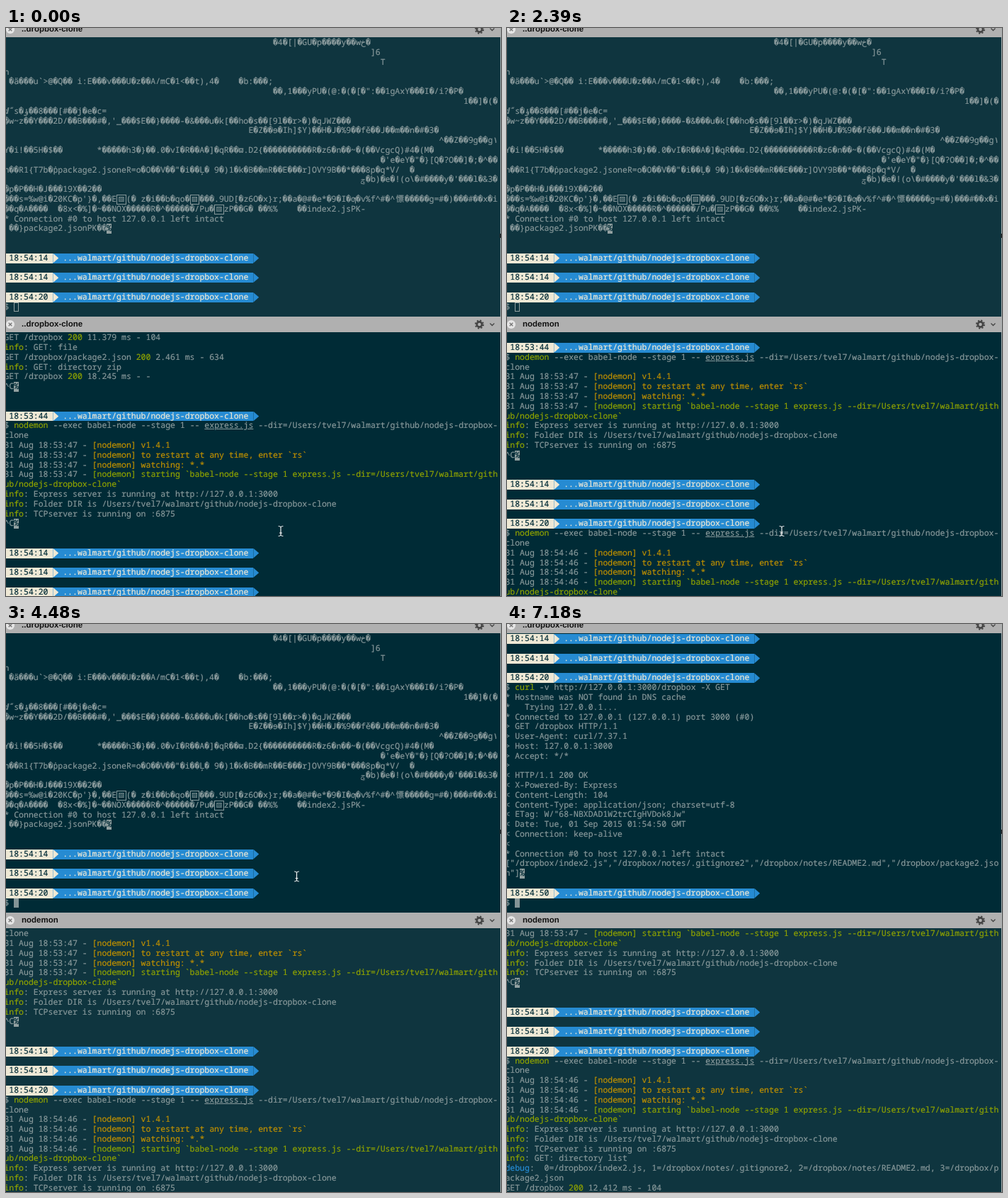
Recreate the animation shown at these times as an HTML page. Size 699 by 801 pixels, loop 8000 ms.

```html
<!DOCTYPE html>
<html lang="en">
<head>
<meta charset="utf-8">
<title>Terminal session</title>
<style>
  :root { --w: 6.9px; --h: 13.8px; --base: #002b36; --idle: #0f353f; --cream: #eee8d5; --blue: #268bd2; --text: #87989a; }
  html, body { margin: 0; width: 100%; height: 100%; overflow: hidden; background: var(--base); }
  #stage { position: relative; width: 699px; height: 801px; overflow: hidden; background: var(--base); }
  .pane { position: absolute; left: 0; width: 698px; height: 408px; background: var(--idle); }
  .pane.active { background: var(--base); }
  .view { position: absolute; left: 0; top: 14.2px; width: 698px; height: 387px; overflow: hidden; }
  .buffer { position: absolute; left: -2.6px; top: 0; }
  .line {
    height: var(--h); white-space: pre; color: var(--text);
    font: 11.5px/13.8px "Noto Sans Mono", "DejaVu Sans Mono", monospace;
    text-rendering: geometricPrecision; font-variant-ligatures: none;
    -webkit-text-stroke: .2px;
  }
  .line > i, .line > b { display: inline-block; height: var(--h); vertical-align: top; font-style: normal; font-weight: 400; }
  .cell { width: var(--w); font-family: "DejaVu Sans Mono", "Noto Sans Mono", monospace; }
  .wide { width: calc(2 * var(--w)); text-align: center; }
  .box { box-sizing: border-box; box-shadow: inset 0 0 0 1px var(--text); }
  .g { color: #8fa300; }
  .y { color: #bf9000; }
  .b { color: var(--blue); }
  .u { text-decoration: underline; }
  .mark { width: var(--w); background: #93a1a1; color: var(--base); }
  .time { background: var(--cream); color: var(--base); }
  .path { background: var(--blue); color: var(--cream); }
  .tip { position: relative; width: var(--w); background: var(--under); }
  .tip::before {
    content: ""; display: block; width: calc(100% + 1px); height: 100%; background: var(--over);
    clip-path: polygon(0 0, 100% 50%, 0 100%);
  }
  .caret { position: absolute; top: 386.8px; width: 6.9px; height: 13.4px; box-sizing: border-box; }
  .bar { position: absolute; left: 0; top: -9px; width: 698px; height: 22px; background: #b0b0b0; }
  .bar span {
    position: absolute; left: 22px; top: 4px; color: #111; white-space: pre;
    font: bold 11.5px/14px "Liberation Sans", Arial, sans-serif; text-rendering: geometricPrecision;
  }
  .bar svg { position: absolute; left: 0; top: 1px; }
  .edge { position: absolute; right: 0; top: 0; width: 1px; height: 100%; background: #a9aeae; }
  .grip { position: absolute; right: 0; top: 290px; width: 2px; height: 6px; background: #1b2427; }
  #mouse { position: absolute; left: 0; top: 0; overflow: visible; }
</style>
</head>
<body>
<div id="stage">
  <div class="pane" id="top" style="top:0"></div>
  <div class="pane" id="low" style="top:416px"></div>
  <div class="edge"></div>
  <div class="grip"></div>
  <svg id="mouse" width="1" height="1">
    <path id="beam" d="M-3.4-7Q-.6-7 0-5.4Q.6-7 3.4-7M-3.4 7Q-.6 7 0 5.4Q.6 7 3.4 7M0-5.6V5.6M-1.8 2.6H1.8"
      fill="none" stroke="#f2f2f2" stroke-width="1.2"/>
    <path id="arrow" d="M0-1V11L2.8 8.5L4.8 13L6.9 12L5 7.8H8.8Z" fill="#000" stroke="#fff" stroke-width="1"/>
  </svg>
</div>
<script>
const LOOP = 8000, ROW = 13.8, COL = 6.9, LEFT = -2.6;
const $ = id => document.getElementById(id);
const esc = s => s.replace(/&/g, '&amp;').replace(/</g, '&lt;');
const ink = c => s => `<span class="${c}">${esc(s)}</span>`;
const green = ink('g'), yellow = ink('y'), blue = ink('b'), under = ink('u');

const MARK = '<i class="mark">%</i>';
const tip = (over, below) => `<i class="tip" style="--over:${over};--under:${below}"></i>`;
const prompt = time => `<b class="time"> ${time} </b>` + tip('var(--cream)', 'var(--blue)') +
  '<b class="path"> ...walmart/github/nodejs-dropbox-clone </b>' + tip('var(--blue)', 'none');
const info = s => green('info') + ': ' + s;
const hit = (path, rest) => `GET ${path} ${green('200')} ${rest}`;

// Binary output: ¿ is an undecodable byte, every other odd glyph is kept to its cell.
const kind = c => c === '▧' ? 'wide box' : c === '慓' ? 'wide' : 'cell';
const noise = (col, s) => ' '.repeat(col) + esc(s).replace(/¿/g, '\uFFFD')
  .replace(/[^\x00-\x7f]/gu, c => `<i class="${kind(c)}">${c}</i>`);

const DIR = '/Users/tvel7/walmart/github/nodejs-dropbox-clone';
const start = time => {
  const log = s => `31 Aug ${time} - ${s}`;
  return [
    `$ ${green('nodemon')} --exec babel-node --stage 1 -- ${under('express.js')} --dir=${DIR.slice(0, -5)}`,
    'clone',
    log(yellow('[nodemon] v1.4.1')),
    log(yellow('[nodemon] to restart at any time, enter `rs`')),
    log(yellow('[nodemon] watching: *.*')),
    log(green('[nodemon] starting `babel-node --stage 1 express.js --dir=' + DIR.slice(0, 25))),
    green(DIR.slice(25) + '`'),
    info('Express server is running at http://127.0.0.1:3000'),
    info('Folder DIR is ' + DIR),
    info('TCPserver is running on :6875')
  ];
};
const idle = [prompt('18:54:14'), '', prompt('18:54:14'), '', prompt('18:54:20')];

const topLines = [
  noise(55, '¿4¿[|¿GU¿p¿¿¿¿y¿¿wخ¿'),
  noise(75, ']6'),
  noise(77, 'T'),
  'h',
  noise(1, '¿ä¿¿¿u`>@¿Q¿¿ i:E¿¿¿v¿¿¿U¿z¿¿A/mC¿1<¿¿t),4¿    ¿b:¿¿¿;'),
  noise(55, '¿¿,1¿¿¿yPU¿(@:¿(¿[¿":¿¿1gAxY¿¿¿I¿/i?¿P¿'),
  noise(94, '1¿¿]¿(¿'),
  noise(0, 'ⅆ˝s¿ؤ¿¿8¿¿¿[#¿¿j¿e¿c='),
  noise(0, "¿w~z¿¿Y¿¿¿2D/¿¿B¿¿¿#¿,'_¿¿¿$E¿¿}¿¿¿¿-¿&¿¿¿u¿k[¿¿ho¿s¿¿[9l¿¿r>¿)¿qJWZ¿¿¿"),
  noise(50, 'E¿Z¿¿ɘ¿Ih]$Y)¿¿H¿J¿%9¿¿fĕ¿¿J¿¿m¿¿n¿#¿3¿'),
  noise(89, '^¿¿Z¿¿9g¿¿g۱'),
  noise(0, 'Y¿i!¿¿5H¿$¿¿       *¿¿¿¿¿h3¿}¿¿.0¿vI¿R¿¿A¿]¿qR¿¿ϖ.D2{¿¿¿¿¿¿¿¿¿¿R¿z6¿n¿¿~¿(¿¿VcgcQ)#4¿(M¿'),
  noise(77, '¿\'e¿eY¿"¿}[Q¿?O¿¿]¿;¿^¿¿'),
  noise(0, 'h¿¿R1{T7b¿ṗpackage2.jsoneR=o¿O¿¿V¿¿"¿i¿¿Ļ¿ 9¿)1¿k¿B¿¿mR¿¿E¿¿¿r]OVY9B¿¿*¿¿¿8p¿q*V/  ¿'),
  noise(73, "ݮ¿b)¿e¿!(o\\¿#¿¿¿¿y¿'¿¿¿l¿&3¿"),
  noise(0, '¿p¿P¿¿H¿J¿¿¿19X¿¿2¿¿'),
  noise(0, "¿¿¿s=%w@i¿20KC¿p'}¿,¿¿E▧(¿ z¿i¿¿b¿qo¿▧¿¿¿.9UD[¿z6O¿x}r;¿¿a¿@#¿e*¿9¿I¿ƣ¿v%f^#¿^慓¿¿¿¿¿g=#¿)¿¿¿#¿¿x¿i"),
  noise(0, '¿¿q¿A¿¿¿¿  ¿8x<¿%]¿~¿¿NOX¿¿¿¿¿R¿^¿¿¿¿¿¿/Pu¿▧zP¿¿G¿ ¿¿%%    ¿¿index2.jsPK-'),
  '* Connection #0 to host 127.0.0.1 left intact',
  noise(1, '¿¿}package2.jsonPK¿¿') + MARK,
  '', '',
  ...idle,
  `$ <span id="command">${green('curl')} -v http://127.0.0.1:3000/dropbox -X GET</span>`,
  ...[
    '* Hostname was NOT found in DNS cache',
    '*   Trying 127.0.0.1...',
    '* Connected to 127.0.0.1 (127.0.0.1) port 3000 (#0)',
    '> GET /dropbox HTTP/1.1',
    '> User-Agent: curl/7.37.1',
    '> Host: 127.0.0.1:3000',
    '> Accept: */*',
    '>',
    '< HTTP/1.1 200 OK',
    '< X-Powered-By: Express',
    '< Content-Length: 104',
    '< Content-Type: application/json; charset=utf-8',
    '< ETag: W/"68-NBXDAD1W2trCIgHVDok8Jw"',
    '< Date: Tue, 01 Sep 2015 01:54:50 GMT',
    '< Connection: keep-alive',
    '<',
    '* Connection #0 to host 127.0.0.1 left intact',
    '["/dropbox/index2.js","/dropbox/notes/.gitignore2","/dropbox/notes/README2.md","/dropbox/package2.jso'
  ].map(esc),
  'n"]' + MARK,
  '',
  prompt('18:54:50'),
  '$'
];

const lowLines = [
  hit('/dropbox', '11.379 ms - 104'),
  info('GET: file'),
  hit('/dropbox/package2.json', '2.461 ms - 634'),
  info('GET: directory zip'),
  hit('/dropbox', '18.245 ms - -'),
  '^C' + MARK, '', '',
  prompt('18:53:44'),
  ...start('18:53:47'),
  '^C' + MARK, '', '',
  ...idle,
  ...start('18:54:46'),
  info('GET: directory list'),
  blue('debug') + ':  0=/dropbox/index2.js, 1=/dropbox/notes/.gitignore2, 2=/dropbox/notes/README2.md, 3=/dropbox/p',
  'ackage2.json',
  hit('/dropbox', '12.412 ms - 104')
];

const BAR = `<div class="bar"><span>..dropbox-clone</span>
  <svg width="698" height="20" fill="none">
    <circle cx="6" cy="10" r="6" fill="#e6e6e6"/>
    <path d="M3.7 7.7l4.6 4.6m0-4.6l-4.6 4.6" stroke="#777" stroke-width="1.4"/>
    <g stroke="#444"><circle cx="668.5" cy="10" r="3.6" stroke-width="2.6"/>
    <circle cx="668.5" cy="10" r="5.6" stroke-width="1.8" stroke-dasharray="2.2 2.2"/>
    <path d="M683.5 8.5l3 3 3-3" stroke-width="1.3"/></g>
  </svg></div>`;

function makePane(id, lines) {
  const el = $(id);
  el.innerHTML = '<div class="view"><div class="buffer">' +
    lines.map(s => `<div class="line">${s}</div>`).join('') +
    '</div></div><div class="caret"></div>' + BAR;
  const part = s => el.querySelector(s);
  return { el, buffer: part('.buffer'), caret: part('.caret'), title: part('.bar span') };
}
const upper = makePane('top', topLines), lower = makePane('low', lowLines);
lower.caret.style.display = 'none';
const command = $('command');

// Each step changes some of the state and holds until the next one.
const steps = [
  [0, { x: 388, y: 709.5, shape: 'beam', low: 0, top: 0, title: '..dropbox-clone', focus: 'low', typed: false, col: 2, caret: 'hollow' }],
  [450, { shape: 'arrow' }],
  [900, { shape: 'beam' }],
  [1050, { low: 1 }],
  [2090, { low: 2, title: 'nodemon' }],
  [2390, { low: 7 }],
  [3440, { y: 692 }],
  [3590, { x: 287.5, y: 286 }],
  [3740, { x: 282, y: 273, low: 10 }],
  [3880, { x: 336, y: 296 }],
  [4030, { x: 410.5, y: 356 }],
  [4480, { focus: 'top', caret: '#839496' }],
  [5080, { shape: 'arrow' }],
  [5380, { shape: 'beam', typed: true, col: 46, caret: '#f0f0ec' }],
  [6280, { top: 22, low: 14, col: 2, caret: '#839496' }],
  [7030, { x: 253, y: 288 }],
  [7180, { shape: 'none' }]
];
const stateAt = t => Object.assign({}, ...steps.filter(s => s[0] <= t).map(s => s[1]));

function draw() {
  const s = stateAt(performance.now() % LOOP);
  upper.buffer.style.top = -s.top * ROW + 'px';
  lower.buffer.style.top = -s.low * ROW + 'px';
  lower.title.textContent = s.title;
  upper.el.classList.toggle('active', s.focus === 'top');
  lower.el.classList.toggle('active', s.focus === 'low');
  command.style.visibility = s.typed ? 'visible' : 'hidden';
  const hollow = s.caret === 'hollow';
  upper.caret.style.left = LEFT + s.col * COL + 'px';
  upper.caret.style.background = hollow ? 'none' : s.caret;
  upper.caret.style.border = hollow ? '1px solid #93a1a1' : 'none';
  $('mouse').style.transform = `translate(${s.x}px, ${s.y}px)`;
  for (const id of ['beam', 'arrow']) $(id).style.display = s.shape === id ? '' : 'none';
  requestAnimationFrame(draw);
}
draw();
</script>
</body>
</html>
```
